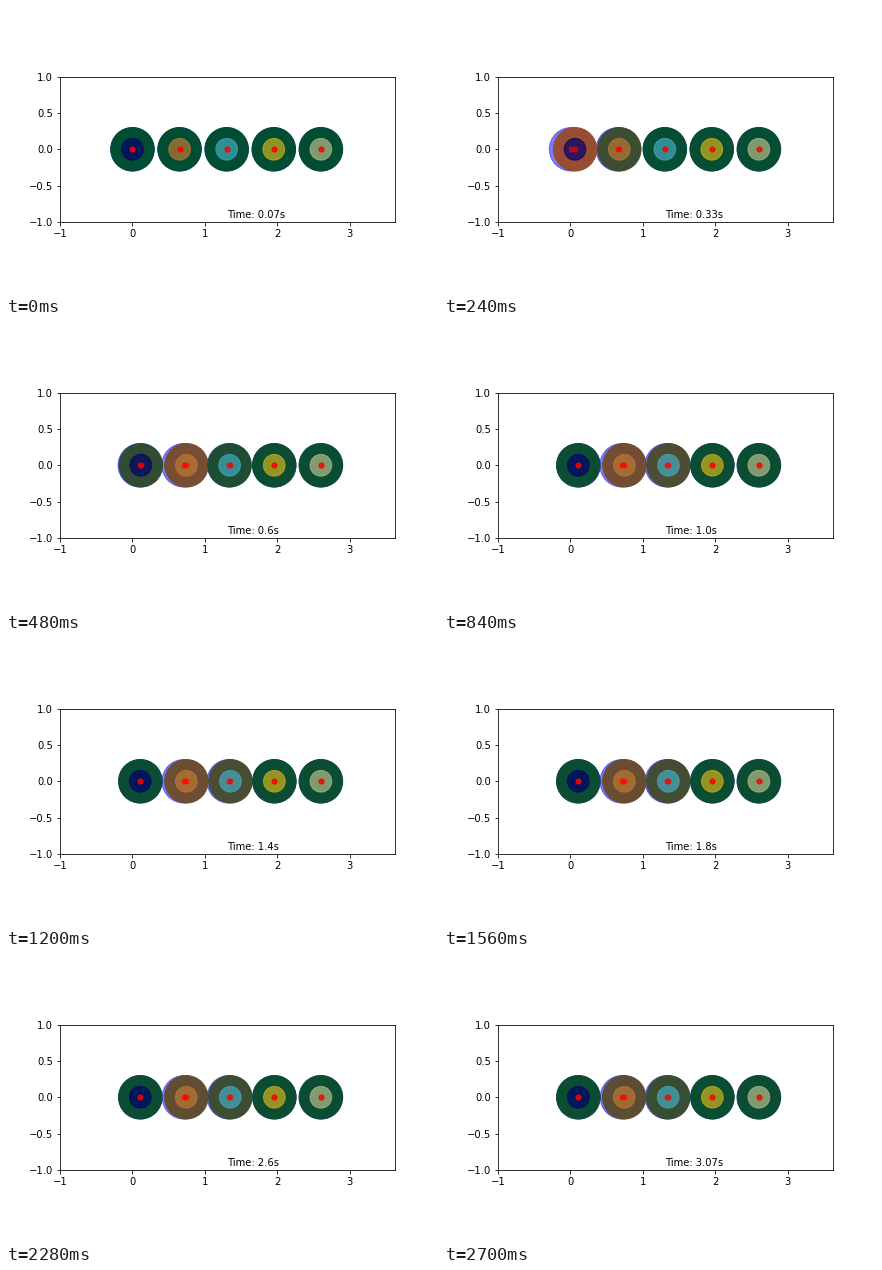
Recreate the animation shown at these times as a matplotlib script. Size 432x288 px, loop 2760 ms.

```python
import math

import matplotlib.pyplot as plt
import numpy as np
from matplotlib.animation import FuncAnimation
from matplotlib.patches import Circle

FRAMES, STEP_MS, STEPS_PER_SECOND = 46, 60, 15
SPACING, RADIUS, CORE_RADIUS = 0.65, 0.3, 0.15
RISE = 6                # frames a push takes
FIRST_PUSH, RELAY = 1.7, 0.7    # start of the push and its delay per cell
STRETCH = 1 / 10.5      # gap between the two halves per unit of strain

CORE_COLORS = [
    (0.0, 0.0, 0.42),
    (0.74, 0.47, 0.20),
    (0.27, 0.67, 0.75),
    (0.81, 0.70, 0.11),
    (0.70, 0.74, 0.54),
]
SHIFTS = [0.108, 0.0755, 0.04, 0.008, 0]
# Peak, start and decay time of the strain in the cells that are squeezed.
STRAINS = {0: (5.2, 1, 1.97), 1: (0.45, 1, 125), 2: (0.29, 6, 84)}

plt.rcParams.update({"font.family": "DejaVu Sans", "font.size": 10})
fig = plt.figure(figsize=(6, 4), dpi=72, facecolor="white")
fig.subplots_adjust(left=0.125, right=0.9, bottom=0.125, top=0.88)
ax = fig.add_subplot()
ax.set(xlim=(-1, 3.62), ylim=(-1, 1), aspect="equal",
       xticks=range(-1, 4), yticks=np.arange(-1, 1.1, 0.5))


def ease(t):
    t = min(max(t, 0), 1)
    return t * t * (3 - 2 * t)


def strain_at(i, frame):
    peak, start, decay = STRAINS.get(i, (0, 0, 1))
    age = max(frame - start, 0)
    return peak * ease(age / RISE) * math.exp(-age / decay)


def add_disc(radius, color, alpha, zorder):
    return ax.add_patch(Circle((0, 0), radius, color=color, alpha=alpha,
                               lw=1, zorder=zorder))


def add_dot():
    return ax.plot([0], [0], "o", color="red", ms=5, alpha=0.6, zorder=3)[0]


class Cell:
    def __init__(self, i):
        self.i = i
        self.trail = add_disc(RADIUS, "blue", 0.5, 1)
        self.face = add_disc(RADIUS, "green", 1, 2)
        self.core = add_disc(CORE_RADIUS, CORE_COLORS[i], 0.7, 2)
        self.trail_dot, self.dot = add_dot(), add_dot()

    def update(self, frame):
        push = ease((frame - FIRST_PUSH - RELAY * self.i) / RISE)
        middle = SPACING * self.i + SHIFTS[self.i] * push
        strain = strain_at(self.i, frame)
        half = strain * STRETCH / 2
        self.trail.center = (middle - half, 0)
        self.face.center = self.core.center = (middle + half, 0)
        self.trail_dot.set_xdata([middle - half])
        self.dot.set_xdata([middle + half])
        self.face.set_color((strain + 0.04 * ease(frame / 8), 0.3, 0.2))


cells = [Cell(i) for i in range(len(CORE_COLORS))]
label = ax.text(0.5, 0.025, "", transform=ax.transAxes, zorder=4)


def update(frame):
    for cell in cells:
        cell.update(frame)
    label.set_text(f"Time: {round((frame + 1) / STEPS_PER_SECOND, 2)}s")


anim = FuncAnimation(fig, update, frames=FRAMES, interval=STEP_MS,
                     init_func=lambda: update(0), repeat=True, repeat_delay=0)
plt.show()
```
